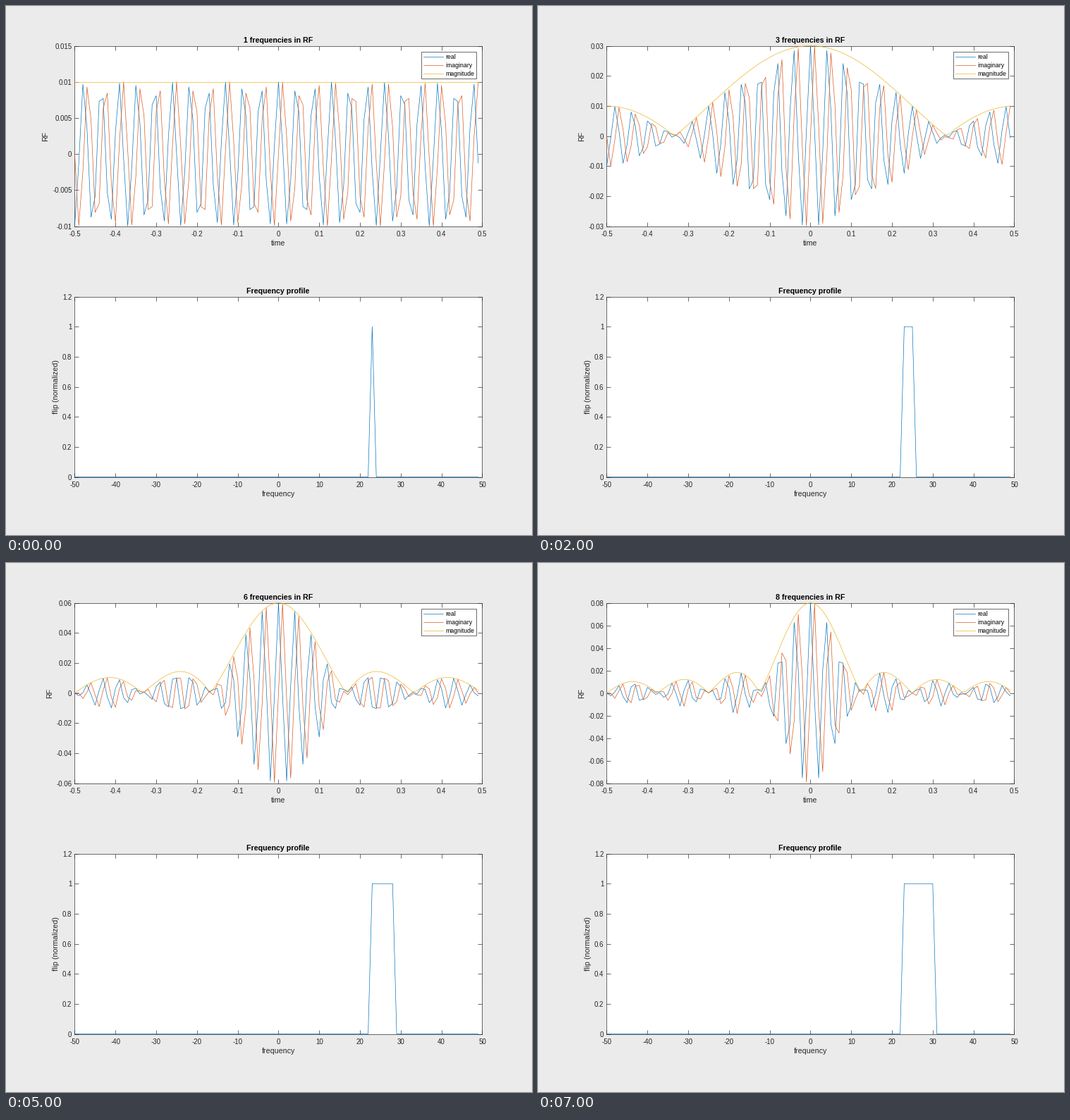
A matplotlib script for the animation above (8000 ms loop, 746 by 751 pixels).

```python
import numpy as np
import matplotlib.pyplot as plt
from matplotlib.animation import FuncAnimation
from matplotlib.patches import Rectangle

W, H, DPI = 746, 751, 64
PX = 72 / DPI  # points per pixel
INK = "#262626"
BLUE, ORANGE, YELLOW = "#0072bd", "#d95319", "#edb120"
LINE = 0.67 * PX
TICK_SIZE = 9.7
LABEL_SIZE = 1.1 * TICK_SIZE
LEGEND_SIZE = 0.9 * TICK_SIZE
BASE_FREQ = 23

plt.rcParams["font.family"] = "Liberation Sans"
plt.rcParams["axes.unicode_minus"] = False

fig = plt.figure(figsize=(W / DPI, H / DPI), dpi=DPI, facecolor="#ebebeb")

# Overlay in pixel coordinates for labels and legend
stage = fig.add_axes([0, 0, 1, 1], zorder=5)
stage.set(xlim=(0, W), ylim=(H, 0))
stage.axis("off")


def put(x, y, text, size=LABEL_SIZE, color=INK, ha="center", **kw):
    return stage.text(x, y, text, fontsize=size * PX, color=color,
                      ha=ha, va="baseline", **kw)


def put_vertical(x, y, text):
    return put(x, y, text, rotation=90, rotation_mode="anchor")


def set_ticks(axis, first, last, step):
    values = np.arange(first, last + 1) * step
    axis.set_ticks(values, [f"{round(v, 6):g}" for v in values])


def make_axes(top):
    # just under half a pixel, so that edges snap to the intended pixel
    ax = fig.add_axes([97.45 / W, 1 - (top + 256.55) / H, 578 / W, 256 / H])
    ax.set_facecolor("white")
    for spine in ax.spines.values():
        spine.set(color=INK, linewidth=LINE)
    ax.tick_params(direction="in", top=True, right=True, length=5.8 * PX,
                   width=LINE, color=INK, labelcolor=INK,
                   labelsize=TICK_SIZE * PX)
    ax.tick_params(axis="x", pad=6 * PX)
    ax.tick_params(axis="y", pad=4 * PX)
    return ax


def add_line(ax, color):
    return ax.plot([], [], color=color, lw=LINE, zorder=3, clip_on=False)[0]


rf_ax = make_axes(56)
rf_ax.set_xlim(-0.5, 0.5)
set_ticks(rf_ax.xaxis, -5, 5, 0.1)
real, imag, mag = [add_line(rf_ax, c) for c in (BLUE, ORANGE, YELLOW)]

freq_ax = make_axes(412)
freq_ax.set(xlim=(-50, 50), ylim=(0, 1.2))
set_ticks(freq_ax.xaxis, -5, 5, 10)
set_ticks(freq_ax.yaxis, 0, 6, 0.2)
profile = add_line(freq_ax, BLUE)

title = put(386.5, 51.6, "", color="black", weight="bold")
put(386, 407.6, "Frequency profile", color="black", weight="bold")
put(386.5, 340, "time")
put(386.5, 696, "frequency")
rf_label = put_vertical(59, 184.5, "RF")
put_vertical(74, 540.5, "flip (normalized)")

stage.add_patch(Rectangle((589.45, 64.55), 78, 38, facecolor="white",
                          edgecolor=INK, linewidth=LINE))
for row, (name, color) in enumerate([("real", BLUE), ("imaginary", ORANGE),
                                     ("magnitude", YELLOW)]):
    y = 71.55 + 12 * row
    stage.plot([592.45, 620.45], [y, y], color=color, lw=LINE)
    put(623, y + 3.5, name, size=LEGEND_SIZE, color="black", ha="left")

t = np.arange(-50, 50) / 100
freqs = np.arange(-50, 50)


def update(i):
    n = i + 1
    band = np.arange(BASE_FREQ, BASE_FREQ + n)
    rf = 0.01 * np.exp(2j * np.pi * np.outer(t, band)).sum(axis=1)
    real.set_data(t, rf.real)
    imag.set_data(t, rf.imag)
    mag.set_data(t, np.abs(rf))
    profile.set_data(freqs, np.isin(freqs, band).astype(float))

    step = 0.005 if n < 3 else 0.01 if n < 6 else 0.02
    low = int(np.ceil(n * 0.01 / step - 1e-9))
    high = low + (n == 1)  # a flat magnitude gets headroom
    rf_ax.set_ylim(-low * step, high * step)
    set_ticks(rf_ax.yaxis, -low, high, step)

    title.set_text(f"{n} frequencies in RF")
    rf_label.set_x(59 if n < 3 else 65)
    return []


anim = FuncAnimation(fig, update, frames=8, interval=1000,
                     repeat=True, repeat_delay=0, blit=False)
plt.show()
```
